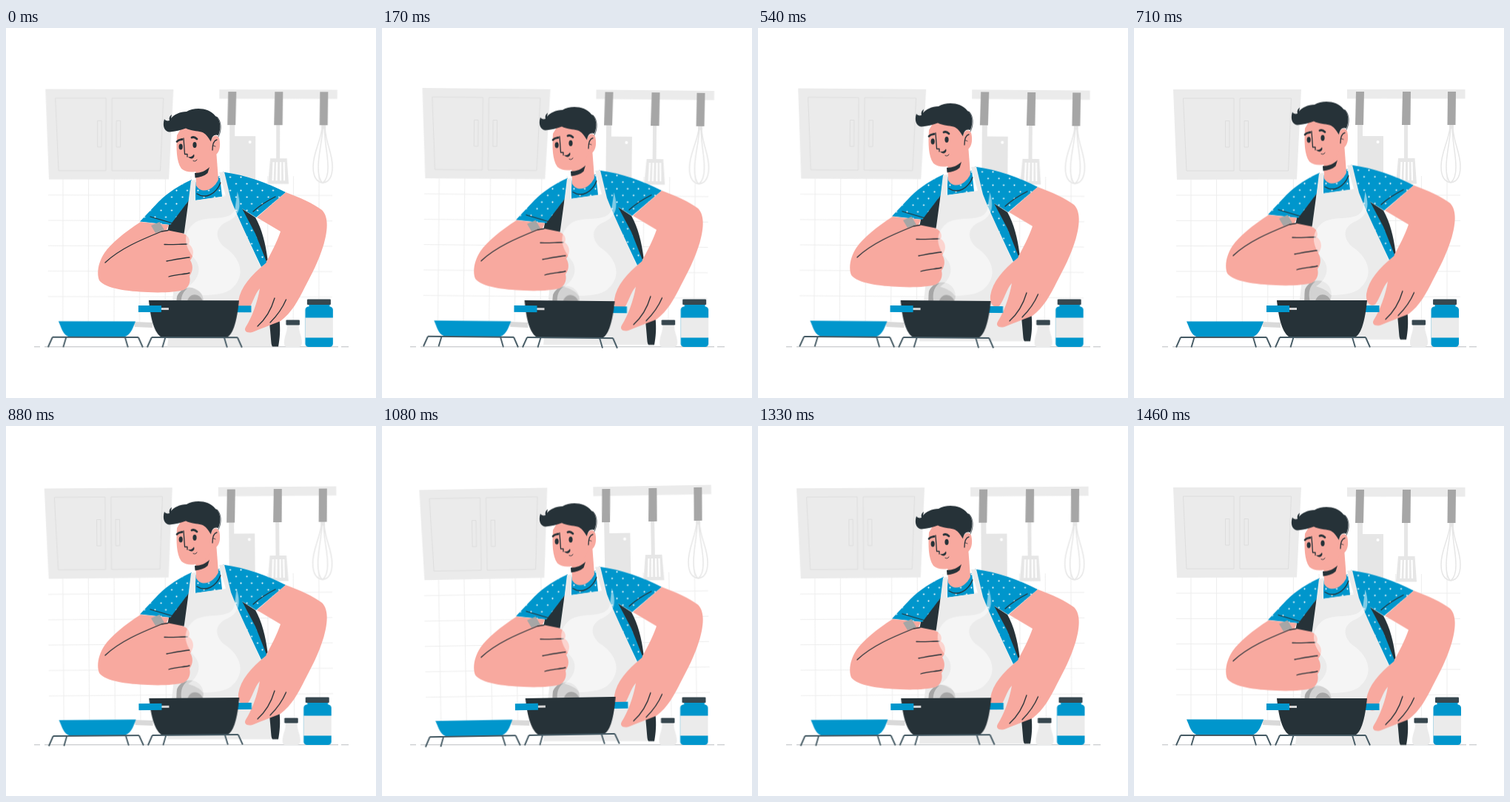
These frames come from a looping animation (500x500 px, 1500 ms). An HTML page:

```html
<!DOCTYPE html>
<html lang="en">
<head>
<meta charset="utf-8">
<title>Cooking</title>
<style>
  html, body { margin: 0; width: 100%; height: 100%; overflow: hidden; background: #fff; }
  svg { display: block; width: 100%; height: 100%; }
  #wall { transform-origin: 250px 240px; }
  #stove { transform-origin: 194px 327px; }
  .pale { fill: #ebebeb; }
  .mid { fill: #a6a6a6; }
  .blue { fill: #0096cc; }
  .dark { fill: #263238; }
  .skin { fill: #f8a99f; }
  .ink { fill: none; stroke: #263238; stroke-linecap: round; stroke-linejoin: round; }
  .edge { fill: none; stroke: #dcdcdc; stroke-width: .9; }
  .wire { fill: none; stroke: #e6e6e6; stroke-width: 1.5; }
  .iron { fill: none; stroke: #455a64; stroke-width: 1.9; }
</style>
</head>
<body>
<svg viewBox="0 0 500 500">
  <defs>
    <pattern id="dots" width="14.5" height="18" patternUnits="userSpaceOnUse">
      <g fill="#fff"><circle cx="6.500" cy="12.500" r="1.050"/><circle cx="13" cy="3.600" r="1.050"/></g>
    </pattern>
    <g id="shirt">
      <path d="M251 205C235 212 219 222 206 235L181 261.500L222 266L247 233Z"/>
      <path d="M256 208L256 233L292 228L289 200Z"/>
      <path d="M293 194.500C325 199 352 209 378 222L338 256L319 244L337 278L352.500 317L345 323L302 232Z"/>
    </g>
    <path id="stand" d="M6 0H122M6 0L0 13.500M24.500 0L20.500 13.500M104 0L108 13.500M122 0L128 13.500"/>
  </defs>

  <g id="wall">
    <path id="tiles" fill="none" stroke="#ededed"/>
    <path class="pale" d="M53 83H226L220 204.500L58 205Z"/>
    <path class="edge" d="M66.500 95H135V193H71ZM143 95H212.500L208.500 193H143ZM123.500 125.500H129V161H123.500ZM149 125.500H154.500V161H149Z"/>
    <path class="pale" d="M288 83H447.500V95.500H288Z"/>
    <path fill="#e6e6e6" d="M302 130H309V146H337V206H302ZM365 130H370V176H379.500L382 210.500H354L357 176H365ZM426 130H432V136H426Z"/>
    <circle cx="329.500" cy="154" r="2" fill="#fff"/>
    <path stroke="#fff" stroke-width="2.200" d="M361.500 181L360.500 206M366 181L365.500 206M371 181V206M375.500 181L376 206"/>
    <path class="wire" d="M427 135C424 156 415 168 415 187C415 202 421 208 428 209C436 208 441 201 441 187C441 168 432 156 431 135M428 135C426 160 422 170 422 188C422 200 425 207 428 209C432 206 435 200 435 188C435 170 431 160 430 135"/>
    <path class="mid" d="M300 86H311L310 131H299ZM363 86H374L373.500 131H362ZM424 86H435L434.500 131H423.500Z"/>
  </g>

  <path stroke="#a9adb0" stroke-width=".8" d="M38 430.800H46M52 430.800H449M453 430.800H463"/>

  <g id="cook" stroke-width="1.300">
    <path class="dark" d="M340 392L369.500 394C371 408 370 420 368 430.500H360ZM248 221L220 266L218 276L243 278ZM314 241L337 256C346 272 351 292 353.500 313L350 318Z"/>
    <use href="#shirt" class="blue" stroke="none"/>
    <use href="#shirt" fill="url(#dots)" stroke="none"/>
    <path class="ink" d="M195 255L229 265M334 248C344 239 354 233 364 228M258 224C270 232 284 224 290 209"/>
    <path class="skin" d="M256 184L257 213C265 226 281 218 287 205L284 165Z"/>
    <path class="pale" d="M250 206L257 205L255 233L297 227L288 195L295 194.500L304 232C314 258 330 290 344 323C352 349 356 394 359 430.500H218L228 340L241 275L247 231Z"/>

    <path class="skin" d="M231 145C230 163 230 180 237 190C246 198 264 195 272 185L279 172C288 173 291 160 288 149C284 142 278 147 277 153L267 138L240 130Z"/>
    <path class="dark" d="M255 196C263 196 270 193 275 188L272.500 196C268 200 262 202 255.500 202.500Z"/>
    <path class="dark" d="M214 123C211 132 214 140 221 140.500C229 140 236 138 243 135.500C250 139 258 139 264 140.500C270 142 273 148 277 153.500C278 146 282 143 287 145C291 135 290 123 283 119C274 107 254 107 244 113C235 113 227 117 223 122L224 117C221 119 220 122 221 125C218 126 215 125 214 123Z"/>
    <path class="ink" stroke-width=".8" d="M285 120C291 125 292 138 287 147M280 159L283 160"/>
    <path class="ink" d="M279 165C279 157 281 152 285 151"/>
    <ellipse class="dark" cx="236.200" cy="160.500" rx="2.600" ry="4"/>
    <ellipse class="dark" cx="255" cy="158" rx="2.600" ry="4"/>
    <path class="ink" stroke-width="2.800" d="M231 153.500C233 151 235 151 238 150.500M251 148C254 146.500 256 148 258 150"/>
    <path class="ink" d="M240 149L241.500 170.500L245 170.500V174"/>
    <path class="dark" d="M246 174C250 175 252 173 254 170.500C255.500 174 253 176.500 250.500 176.500C249 176.500 247 175.500 246 174Z"/>
    <path class="ink" stroke-width=".9" d="M253 179.500C255 180.500 257 180 258 178"/>

    <path class="mid" d="M232 345L238 342L244 351L238 357Z"/>
    <circle cx="248.500" cy="369" r="18.300" fill="#d2d2d2"/>
    <path class="mid" d="M231 363C234 356 239 353 245 352C237 358 235 368 238 380H230Z"/>

    <path class="skin" d="M182 262C160 276 142 291 133 304C125 316 122 331 126 341C134 352 164 356 192 357C209 358 230 357 240 354C247 351 250 343 248 335C253 329 253 320 249 314C255 306 254 297 247 292C250 285 245 279 237 277L217 273L220 266Z"/>
    <path class="mid" d="M196 267L207.500 262L214 273L202 277Z"/>
    <path class="ink" d="M134 317C154 298 183 286 210 275L219 273.500M214 292.500C225 293 235 292 245 292M217 315C228 313 238 311 248 310M220 336C230 333 240 333 248 331"/>

    <path class="skin" d="M378 222C397 229 415 237 427 246C437 256 434 276 429.500 292C423 314 413 333 404 350C395 368 386 385 371 396C356 402 343 407 333 411C325 413 321 409 324 404C332 392 340 370 343 352C336 359 333 374 326 383C319 387 313 380 314 369C317 350 331 334 351 318C358 304 366 290 371 275L339 256Z"/>
    <path class="ink" d="M363 365C358 382 350 394 340 403M378.500 367C373 380 366 389 357 398"/>
  </g>

  <g id="stove">
    <path class="mid" d="M245 369C248 358 261 357 266 369Z"/>
    <path fill="#d9d9d9" d="M173 397L198 398V405L174 404Z"/>
    <path class="blue" d="M71 396.500H175C171 407 168 417 157 418H89C77 417 76 407 71 396.500ZM313 375H331.500V384H313Z"/>
    <path class="dark" d="M193 368H315C313 388 309 411 300 417H209C199 410 195 388 193 368Z"/>
    <path class="blue" d="M179 375H210V384H179Z"/>
    <path fill="#d6d6d6" d="M210 378H220V381H210Z"/>
    <use href="#stand" class="iron" x="57" y="418"/>
    <use href="#stand" class="iron" x="191" y="418"/>
    <path fill="#fff" opacity=".5" d="M312.500 221C318 239 317 253 300 261C283 268 281 282 294 295C317 310 326 334 304 353C296 359 282 361 266 361C262 355 255 352 246 349C261 340 265 323 255 312C239 293 239 276 255 263C274 251 309 265 310 239Z"/>
  </g>

  <g id="jars">
    <path class="pale" d="M380 400H396C395 410 400 416 400 425C400 429 398 431 395 431H380C377 431 376 429 376 425C376 416 381 410 380 400Z"/>
    <rect x="378.500" y="394.500" width="18.500" height="7" rx="1" fill="#37474f"/>
    <rect class="blue" x="409.500" y="372" width="28" height="10"/>
    <rect class="blue" x="404.500" y="376.500" width="37.500" height="54.500" rx="4.500"/>
    <rect class="pale" x="404.500" y="391.500" width="37.500" height="27"/>
    <rect x="407" y="366.500" width="32" height="7.500" rx="1" fill="#37474f"/>
  </g>
</svg>
<script>
  const $ = id => document.getElementById(id);

  const TILE = 34.6;
  let tiles = '';
  for (let i = 0; i < 11; i++) tiles += `M${77 + i * TILE} 200V397`;
  for (let i = 0; i < 5; i++) tiles += `M57 ${226 + i * TILE - i * .3}H441`;
  $('tiles').setAttribute('d', tiles);

  // The loop opens a little way into the cycle.
  const loop = (id, frames) => $(id).animate(
    frames.map(([offset, transform]) => ({ offset, transform })),
    { duration: 1500, delay: -40, iterations: Infinity, easing: 'linear' }
  );
  const sway = [[0, 'rotate(0deg)'], [.25, 'rotate(1deg)'], [.75, 'rotate(-1deg)'], [1, 'rotate(0deg)']];
  const shift = (from, to) => [[0, `translate(${from})`], [.5, `translate(${to})`], [1, `translate(${from})`]];

  loop('wall', sway);
  loop('stove', sway);
  loop('cook', shift('0px, .5px', '0px, -9.5px'));
  loop('jars', shift('0px, 0px', '-3px, 0px'));
</script>
</body>
</html>
```
